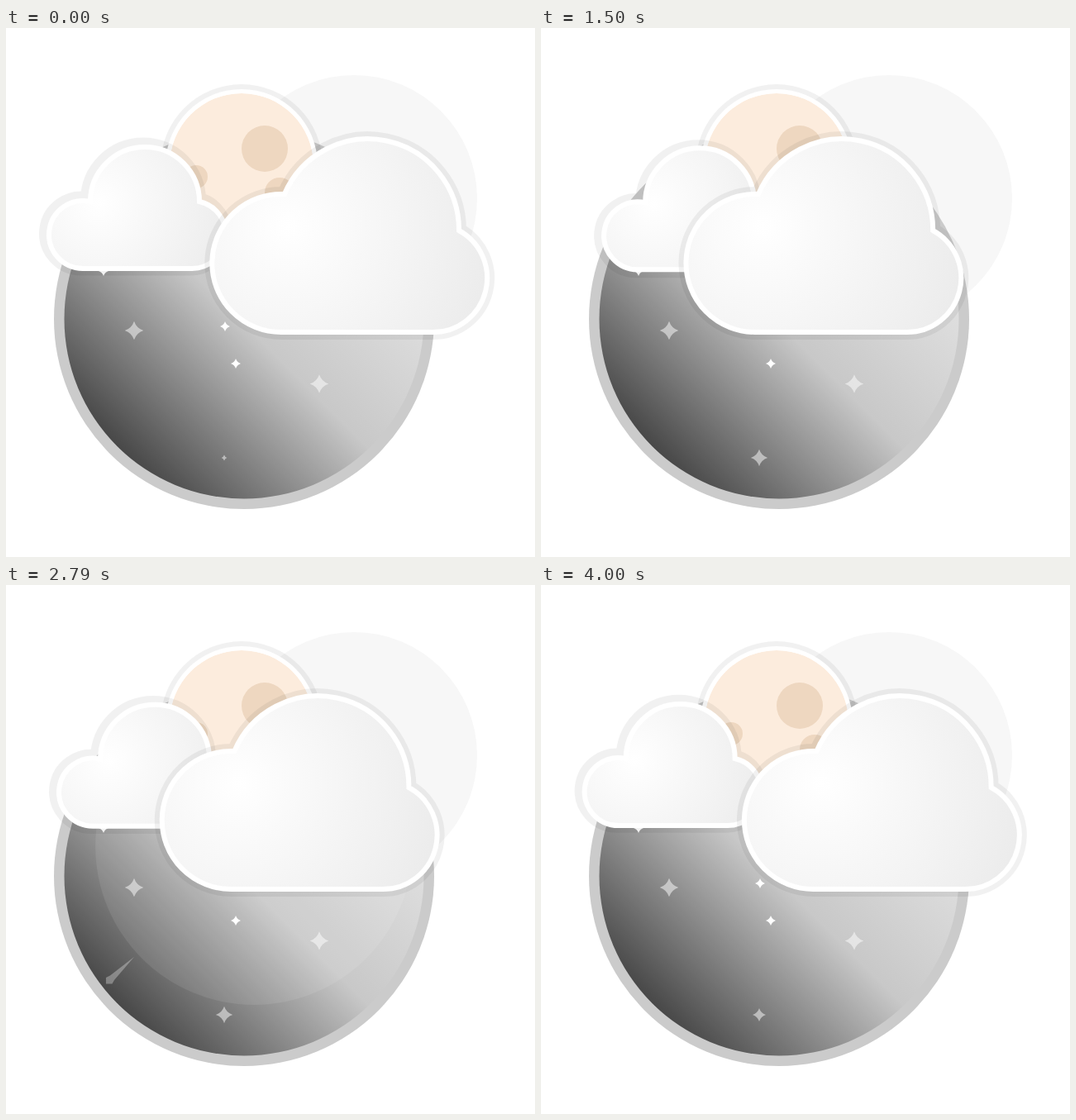
These frames come from a looping animation (640 by 640 pixels, 4070 ms). An HTML page:

```html
<!DOCTYPE html>
<html lang="en">
<head>
<meta charset="utf-8">
<title>Cloudy night</title>
<style>
  html, body { margin: 0; width: 100%; height: 100%; overflow: hidden; background: #fff; }
  svg { display: block; width: 100%; height: 100%; }
  .outline { stroke: #fff; stroke-width: 6; }
  .shade { fill: #000; stroke: #000; opacity: .052; }
</style>
</head>
<body>
<svg viewBox="0 0 640 640">
  <defs>
    <linearGradient id="night" gradientUnits="userSpaceOnUse" x1="134.5" y1="505.5" x2="441.5" y2="198.5">
      <stop offset="0" stop-color="#484848"/>
      <stop offset=".49" stop-color="#c8c8c8"/>
      <stop offset="1" stop-color="#e6e6e6"/>
    </linearGradient>
    <radialGradient id="bigFill" gradientUnits="userSpaceOnUse" cx="342" cy="240" r="245">
      <stop offset="0" stop-color="#fff"/>
      <stop offset="1" stop-color="#ececec"/>
    </radialGradient>
    <radialGradient id="smallFill" gradientUnits="userSpaceOnUse" cx="112" cy="212" r="155">
      <stop offset="0" stop-color="#fff"/>
      <stop offset="1" stop-color="#ededed"/>
    </radialGradient>
    <clipPath id="disc"><circle cx="288" cy="352" r="230"/></clipPath>
    <clipPath id="sky"><circle cx="288" cy="352" r="217.5"/></clipPath>
    <clipPath id="moonDisc"><circle cx="285" cy="166" r="87"/></clipPath>
    <path id="sparkle" d="M0-1Q.25-.25 1 0Q.25.25 0 1Q-.25.25-1 0Q-.25-.25 0-1Z"/>
    <path id="bigShape" d="M333.5 368A83.5 83.5 0 1 1 336.8 201.1A110 110 0 0 1 548 245A65.5 65.5 0 0 1 516.5 368Z"/>
    <path id="smallShape" d="M93 291A41 41 0 1 1 102 210A66 66 0 0 1 234 210A41 41 0 0 1 224 291Z"/>
  </defs>

  <circle cx="421" cy="206" r="149" fill="#f7f7f7"/>
  <circle cx="288" cy="352" r="230" fill="#cbcbcb"/>
  <circle cx="288" cy="352" r="217.5" fill="url(#night)"/>
  <g clip-path="url(#disc)"><circle id="glow" cx="300" cy="316" r="0" fill="#fff"/></g>

  <g fill="#fff">
    <use href="#sparkle" transform="translate(155 366) scale(11.3)" opacity=".5"/>
    <use href="#sparkle" transform="translate(379 430.5) scale(11.3)" opacity=".5"/>
    <use href="#sparkle" transform="translate(265 361) scale(6)"/>
    <use href="#sparkle" transform="translate(278 406) scale(6)"/>
    <use href="#sparkle" transform="translate(118 294) scale(6)"/>
    <use id="twinkle" href="#sparkle" opacity=".5"/>
    <g clip-path="url(#sky)">
      <path id="meteor" d="M186 419L157 441.5L152 444V451.5H159.5L162 447Z"/>
    </g>
  </g>

  <circle cx="285" cy="166" r="98" opacity=".055"/>
  <circle cx="285" cy="166" r="92" fill="#fff"/>
  <g clip-path="url(#moonDisc)" fill="#eed7c0">
    <circle cx="285" cy="166" r="87" fill="#fcecdd"/>
    <circle cx="313" cy="146" r="28"/>
    <circle cx="230" cy="180" r="14"/>
    <circle cx="331" cy="199" r="18"/>
  </g>

  <use id="smallShade" href="#smallShape" class="shade" stroke-width="20"/>
  <use id="small" href="#smallShape" class="outline" fill="url(#smallFill)"/>
  <g id="big">
    <use href="#bigShape" class="shade" stroke-width="18"/>
    <use href="#bigShape" class="outline" fill="url(#bigFill)"/>
  </g>
</svg>
<script>
  const LOOP = 4070, STEPS = 57, STEP = LOOP / STEPS;

  // Rises from 0 to 1 between two times.
  const ramp = (t, from, to) => Math.min(1, Math.max(0, (t - from) / (to - from)));
  // Drifts out until the turn, then back by the end of the loop.
  const drift = (t, turn) => ramp(t, 0, turn) - ramp(t, turn, LOOP);

  const el = id => document.getElementById(id);
  const set = (id, key, value) => el(id).setAttribute(key, value);
  const move = (id, x, y) => set(id, 'transform', `translate(${x} ${y})`);

  function draw(t) {
    const away = drift(t, 1300);
    const x = 26 * away, y = 1.4 * away;
    move('big', -98 * drift(t, 1990), 0);
    move('small', x, y);
    move('smallShade', x - 2, y - 1.4 * (1 - away));

    const flight = (t - 2430) * .0875;
    move('meteor', -flight, flight);
    set('meteor', 'opacity', .3 * (ramp(t, 1800, 2100) - ramp(t, 2900, 3100)));

    const size = 3.4 + 6.8 * ramp(t, 0, 1500) - 2.2 * ramp(t, 2900, 3300);
    set('twinkle', 'transform', `translate(264 520) scale(${size})`);

    set('glow', 'r', 300 * ramp(t, 2030, 3210));
    set('glow', 'opacity', .085 * (1 - ramp(t, 3210, 3580)));
  }

  const start = performance.now();
  function tick() {
    const t = Math.max(0, performance.now() - start) % LOOP;
    // The small lead keeps each pose in place at the rounded step times.
    draw(Math.min(STEPS - 1, Math.floor((t + 5) / STEP)) * STEP);
    requestAnimationFrame(tick);
  }
  tick();
</script>
</body>
</html>
```
